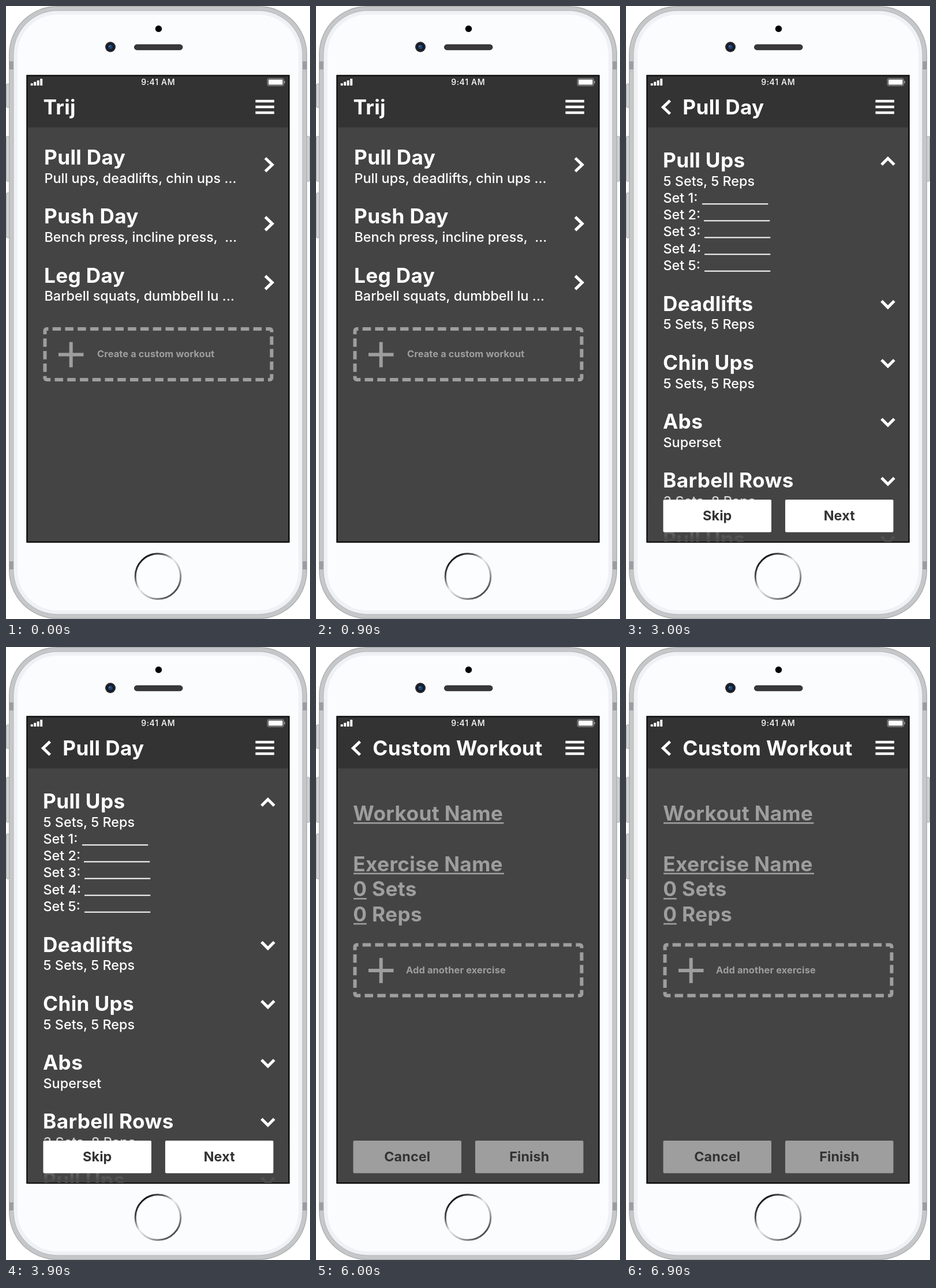
These frames come from a looping animation (527x1063 px, 7500 ms). An HTML page:

```html
<!DOCTYPE html>
<html lang="en">
<head>
<meta charset="utf-8">
<title>Workout app screens</title>
<style>
  html, body { margin: 0; width: 100%; height: 100%; overflow: hidden; background: #fff; }
  svg { display: block; width: 100%; height: 100%; }
  text { font-family: Inter, "Noto Sans", sans-serif; white-space: pre; }
  .head { font-size: 35.2px; font-weight: 700; letter-spacing: .35px; }
  .sub { font-size: 23.4px; font-weight: 500; }
  .label { font-size: 16.4px; font-weight: 700; letter-spacing: .12px; }
  .button { font-size: 23.4px; font-weight: 700; letter-spacing: .1px; }
  .time { font-size: 14.2px; font-weight: 500; letter-spacing: .6px; }
</style>
</head>
<body>
<svg id="stage" viewBox="0 0 527 1063"></svg>
<script>
const HOLD = 1500;
const WHITE = '#fff', BAR = '#333', BACK = '#444', GREY = '#9e9e9e';

const rect = (x, y, w, h, fill, r = 0, extra = '') =>
  `<rect x="${x}" y="${y}" width="${w}" height="${h}" rx="${r}" fill="${fill}" ${extra}/>`;
const circle = (x, y, r, fill, extra = '') =>
  `<circle cx="${x}" cy="${y}" r="${r}" fill="${fill}" ${extra}/>`;
const line = (d, width = 5, color = WHITE) =>
  `<path d="${d}" fill="none" stroke="${color}" stroke-width="${width}"/>`;
const text = (cls, x, y, str, fill = WHITE, anchor = 'start') =>
  `<text class="${cls}" x="${x}" y="${y}" fill="${fill}" text-anchor="${anchor}">${str}</text>`;
const head = (x, y, str, fill) => text('head', x, y, str, fill);
const sub = (x, y, str) => text('sub', x, y, str);

const down = y => line(`M443 ${y - 6}l11 11 11-11`);
const up = y => line(`M443 ${y + 6}l11-11 11 11`);
const right = y => line(`M449.5 ${y - 11.5}l12 11.5-12 11.5`);
const back = line('M76.3 164l-12 11.5 12 11.5');
const burger = line('M432.5 165h32.5m-32.5 10h32.5m-32.5 10h32.5', 4.3);
const cross = line('M437 163.5l23.5 23.5m0-23.5l-23.5 23.5');
const plus = y => line(`M91 ${y}h43.5M112.7 ${y - 21.8}v43.6`, 6, GREY);

const backdrop = rect(37, 121, 453, 808, BACK) + rect(37, 121, 453, 89.5, BAR);
const page = title => backdrop + back + head(98.3, 187.7, title) + burger;
const fade = rect(37, 830, 453, 99, 'url(#fade)');

function dashedBox(y, x, label) {
  return rect(67.5, y + 3, 393, 88, 'none', 3,
    `stroke="${GREY}" stroke-width="6" stroke-dasharray="14.5 7.25" stroke-dashoffset="-10.2"`) +
    text('label', x, y + 52.3, label, GREY);
}

function button(x, w, label, fill = WHITE) {
  return rect(x, 856, w, 56.5, fill, 2) +
    text('button', x + w / 2, 891.7, label, BAR, 'middle');
}

function exercise(y, name, lines, arrow = down) {
  return head(64, y, name) + arrow(y - 11) +
    lines.map((str, i) => sub(64.5, y + 31.8 + i * 29.1, str)).join('');
}

function underlined(y, str, w) {
  return head(64.3, y, str, GREY) + rect(65, y + 3, w, 2.6, GREY);
}

function listContent() {
  const days = [
    ['Pull Day', 'Pull ups, deadlifts, chin ups ...'],
    ['Push Day', 'Bench press, incline press,  ...'],
    ['Leg Day', 'Barbell squats, dumbbell lu ...']
  ];
  return backdrop + head(64.5, 187.7, 'Trij') +
    days.map(([name, moves], i) => {
      const y = 275.2 + i * 102.2;
      return head(66, y, name) + sub(66.5, y + 31.8, moves) + right(y);
    }).join('') +
    dashedBox(557, 158, 'Create a custom workout') + plus(604.6);
}

function menuScene() {
  const items = ['Trij', 'Progress', 'Friends', 'Settings'];
  return listContent() + rect(37, 121, 453, 808, BAR, 0, 'opacity=".7"') +
    rect(215.7, 121, 275, 808, BAR) + cross +
    items.map((name, i) => text('head', 461.8, 275.2 + i * 73, name, WHITE, 'end')).join('');
}

function workoutScene() {
  const reps = ['5 Sets, 5 Reps'];
  const starts = [132, 135, 136, 136, 136];
  const sets = starts.map((x, i) =>
    sub(64.5, 341.2 + i * 29.1, `Set ${i + 1}:`) + rect(x, 342.3 + i * 29.1, 114.3, 2, WHITE)).join('');
  return page('Pull Day') +
    exercise(280.3, 'Pull Ups', reps, up) + sets +
    exercise(528.6, 'Deadlifts', reps) +
    exercise(630.8, 'Chin Ups', reps) +
    exercise(733, 'Abs', ['Superset']) +
    exercise(835.2, 'Barbell Rows', ['3 Sets, 8 Reps']) +
    exercise(937.4, 'Pull Ups', []) +
    fade + button(64.5, 187.5, 'Skip') + button(276, 187.5, 'Next');
}

function doneScene() {
  const stats = ['5 Sets, 5 Reps', 'Average Weight: 154 lbs', 'Calories Burned: 132'];
  const summary = ['You lifted 890 lbs and', 'burned 633 Calories', 'by doing Pull Day!'];
  const camera = `<path d="M94 271h16.5l4.5-7h15.5l4.5 7h16v37h-57z" fill="${GREY}"/>` +
    circle(122.5, 289, 9, BACK);
  return page('Well Done!') + dashedBox(240.7, 175.5, 'Add a progress photo') + camera +
    summary.map((str, i) => head(64, 399.7 + i * 43.6, str)).join('') +
    ['Pull Ups', 'Deadlifts', 'Chin Ups'].map((name, i) =>
      exercise(560 + i * 160.5, name, stats)).join('') +
    fade + button(64.5, 399, 'Finish');
}

function customScene() {
  return page('Custom Workout') +
    underlined(301, 'Workout Name', 260.5) +
    underlined(388.6, 'Exercise Name', 261) +
    underlined(432.2, '0 Sets', 22.8) +
    underlined(475.8, '0 Reps', 22.8) +
    dashedBox(513.5, 156, 'Add another exercise') + plus(561) +
    button(64.5, 187.5, 'Cancel', GREY) + button(276, 187.5, 'Finish', GREY);
}

function phone() {
  const shell = (inset, fill) =>
    rect(5 + inset, inset, 517 - 2 * inset, 1063 - 2 * inset, fill, 84 - inset);
  const key = (x, y, h) => rect(x, y, 8, h, '#d0d1d3', 2, 'stroke="#a5a6a8"');
  const bands = [96, 963].map(y =>
    rect(5.5, y, 8, 14, '#9b9ca0') + rect(513.5, y, 8, 14, '#9b9ca0')).join('');
  return key(.5, 135, 41) + key(.5, 226, 78) + key(.5, 324, 78) + key(518.5, 226, 78) +
    shell(0, '#aaabad') + shell(1.3, '#c6c7c9') + bands +
    shell(7.6, '#b5b6b8') + shell(8.5, '#eff1f4') + shell(15, '#fbfcfe') +
    circle(264.5, 39.5, 5.7, '#000') +
    circle(181, 71, 9, '#24262b') + circle(181, 71, 6, '#10151f') +
    circle(181, 71, 4, '#1f4170') + circle(179.8, 69.8, 1.5, '#4571a5') +
    rect(222.5, 67, 83.5, 9, '#39393b', 4.5, 'stroke="#1d1d1f"') +
    circle(263.5, 989, 39.3, '#fcfdff', 'stroke="url(#ring)" stroke-width="3"') +
    rect(35.3, 119.5, 456.4, 811.2, '#000');
}

function statusBar() {
  const bars = [4, 6.5, 9, 12].map((h, i) => rect(42.7 + i * 5.5, 138 - h, 4, h, WHITE, .8)).join('');
  return bars + text('time', 263.7, 137.2, '9:41 AM', WHITE, 'middle') +
    rect(453.3, 125.8, 28, 12.4, 'none', 2, 'stroke="#aaa" stroke-width="1"') +
    rect(455, 127.4, 24.6, 9.2, WHITE, 1) + rect(482.3, 130, 1.4, 4, '#aaa', .7);
}

const scenes = [listContent() + burger, menuScene(), workoutScene(), doneScene(), customScene()];

document.getElementById('stage').innerHTML = `
  <defs>
    <linearGradient id="fade" x1="0" y1="0" x2="0" y2="1">
      <stop offset="0" stop-color="${BACK}" stop-opacity="0"/>
      <stop offset="1" stop-color="${BACK}"/>
    </linearGradient>
    <linearGradient id="ring" x1=".15" y1=".1" x2=".85" y2=".9">
      <stop offset="0" stop-color="#111"/>
      <stop offset=".2" stop-color="#555"/>
      <stop offset=".45" stop-color="#ececee"/>
      <stop offset=".7" stop-color="#b5b5b7"/>
      <stop offset="1" stop-color="#444"/>
    </linearGradient>
    <clipPath id="screen"><rect x="37.5" y="121.7" width="452" height="806.8"/></clipPath>
  </defs>
  ${phone()}
  <g clip-path="url(#screen)">
    ${scenes.map(s => `<g class="scene">${s}</g>`).join('')}
    ${statusBar()}
  </g>`;

const groups = document.querySelectorAll('.scene');

function draw(time) {
  const current = Math.floor(time / HOLD) % groups.length;
  groups.forEach((g, i) => g.setAttribute('display', i === current ? 'inline' : 'none'));
}

const start = performance.now();
function tick() {
  draw(performance.now() - start);
  requestAnimationFrame(tick);
}
tick();
</script>
</body>
</html>
```
